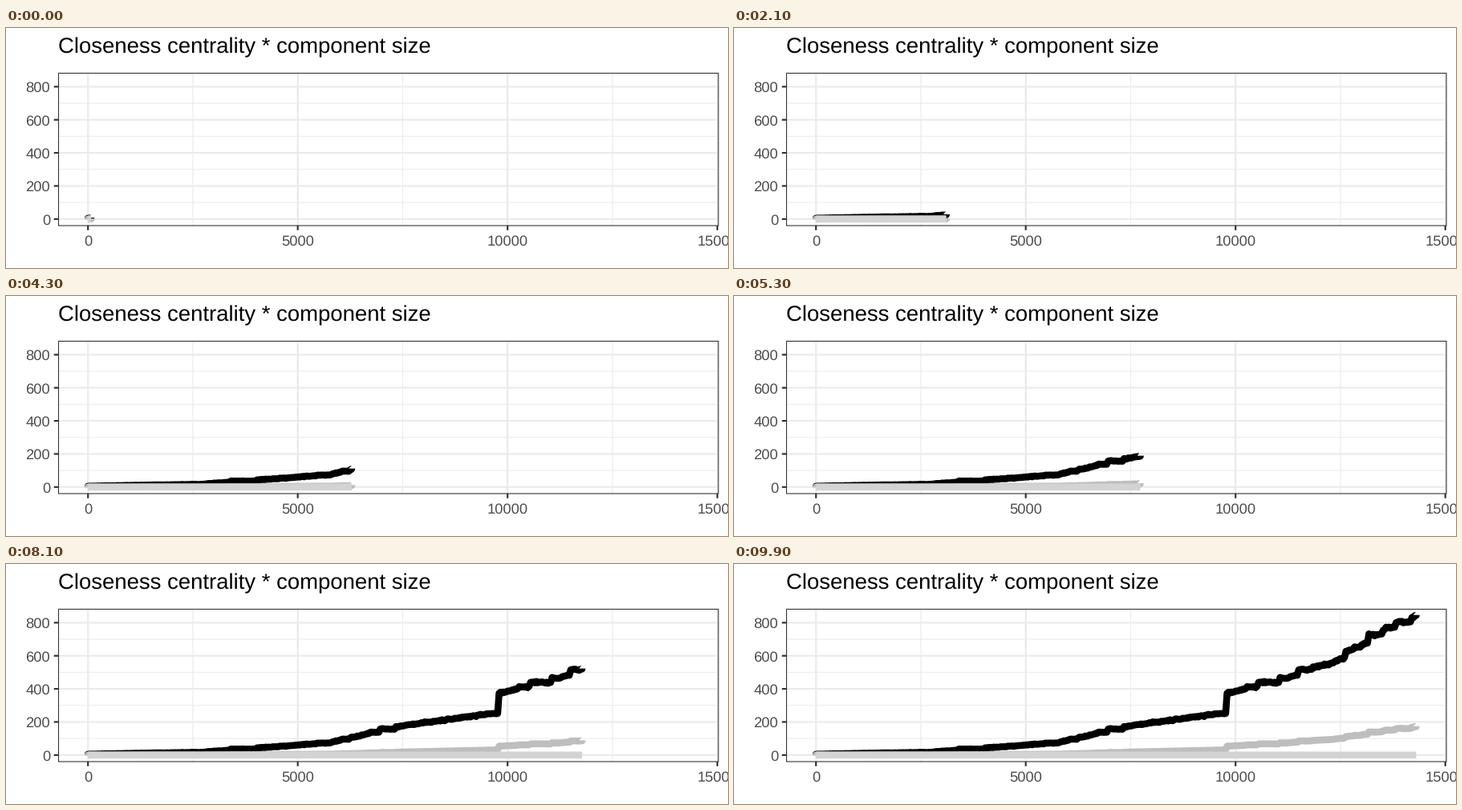
Recreate the animation shown at these times as a matplotlib script. Size 900x300 px, loop 10000 ms.

```python
import matplotlib.pyplot as plt
import numpy as np
from matplotlib.animation import FuncAnimation

plt.rcParams["font.family"] = "Liberation Sans"
plt.rcParams["text.hinting"] = "none"
plt.rcParams["path.simplify"] = False

FRAMES = 100
LEFT, RIGHT, TOP, BOTTOM = 65.5, 888, 56.5, 247
X0, Y0 = 102.2, 238.8
X_UNIT, Y_UNIT = 0.0523, 0.2068
LAST_ID = 14305


def to_x(i):
    return X0 + X_UNIT * i


def to_y(v):
    return Y0 - Y_UNIT * v


def growth(ids):
    """Slow growth, plus a sudden gain whenever large components merge."""
    v = np.interp(ids, [0, 1000, 2700, 5000, 5750, 7500, 9700, 11500, 12250, LAST_ID],
                  [5, 10, 17, 61, 74, 178, 253, 377, 421, 656])
    for at, gain in [(9750, 111), (11530, 20), (12640, 25), (13270, 29)]:
        v = v + gain * (ids >= at)
    return v


def simulate():
    """Follow the growth in small irregular stairs with a little noise."""
    rng = np.random.default_rng(4)
    ids = np.linspace(0, LAST_ID, 420)
    edges = np.cumsum(rng.exponential(90, 300))
    held = ids.copy()
    for a, b in zip(edges, edges[1:]):
        held[(ids >= a) & (ids < b)] = (a + b) / 2
    v = growth(np.minimum(held, LAST_ID))
    return ids, v + rng.normal(0, 0.11, ids.size) * np.sqrt(v)


fig = plt.figure(figsize=(12.5, 300 / 72), dpi=72, facecolor="white")
ax = fig.add_axes([0, 0, 1, 1])
ax.set(xlim=(0, 900), ylim=(300, 0))
ax.axis("off")


def stroke(xs, ys, color, width, z=1):
    line, = ax.plot(xs, ys, color=color, lw=width, zorder=z, snap=False,
                    solid_capstyle="butt", solid_joinstyle="round")
    return line


def label(x, y, text, size, color, ha):
    ax.text(x, y, text, size=size, color=color, ha=ha, va="baseline")


def draw_axes():
    for i in range(0, 15001, 2500):
        x, major = to_x(i), i % 5000 == 0
        stroke([x, x], [TOP, BOTTOM], "#EBEBEB", 2.2 if major else 1.1)
        if major:
            stroke([x, x], [BOTTOM, BOTTOM + 5.75], "#333333", 2.2)
            label(x, 272, str(i), 18.4, "#4D4D4D", "center")
    for v in range(0, 801, 100):
        y, major = to_y(v), v % 200 == 0
        stroke([LEFT, RIGHT], [y, y], "#EBEBEB", 2.2 if major else 1.1)
        if major:
            stroke([LEFT - 5.75, LEFT], [y, y], "#333333", 2.2)
            label(55.2, y + 6.8, str(v), 18.4, "#4D4D4D", "right")
    stroke([LEFT, RIGHT, RIGHT, LEFT, LEFT], [TOP, TOP, BOTTOM, BOTTOM, TOP],
           "#333333", 1.1, 9)
    label(65, 31, "Closeness centrality * component size", 27.45, "black", "left")


draw_axes()
ids, top = simulate()
series = [
    (top, "black", 0.6),
    (171 * (top / 841) ** 1.43, "#BEBEBE", 0.6),
    (0 * top, "#D3D3D3", 0),
]
lines = [stroke([], [], color, 8.6, 3 + k) for k, (_, color, _) in enumerate(series)]


def update(i):
    # Each step reaches half a step ahead, up to the last sample
    end = LAST_ID * min((i + 0.5) / (FRAMES - 1), 1)
    shown = ids < end
    xs = to_x(np.concatenate([[0], ids[shown], [end, end]]))
    for line, (values, _, hook) in zip(lines, series):
        ys = to_y(np.append(values[shown], np.interp(end, ids, values)))
        # Tiny upright end pieces give the rounded corners at both tips
        line.set_data(xs, np.concatenate([[ys[0] + hook], ys, [ys[-1] - hook]]))
    return lines


anim = FuncAnimation(fig, update, frames=FRAMES, interval=100,
                     init_func=lambda: update(0), repeat=True,
                     repeat_delay=0, blit=False)
plt.show()
```
